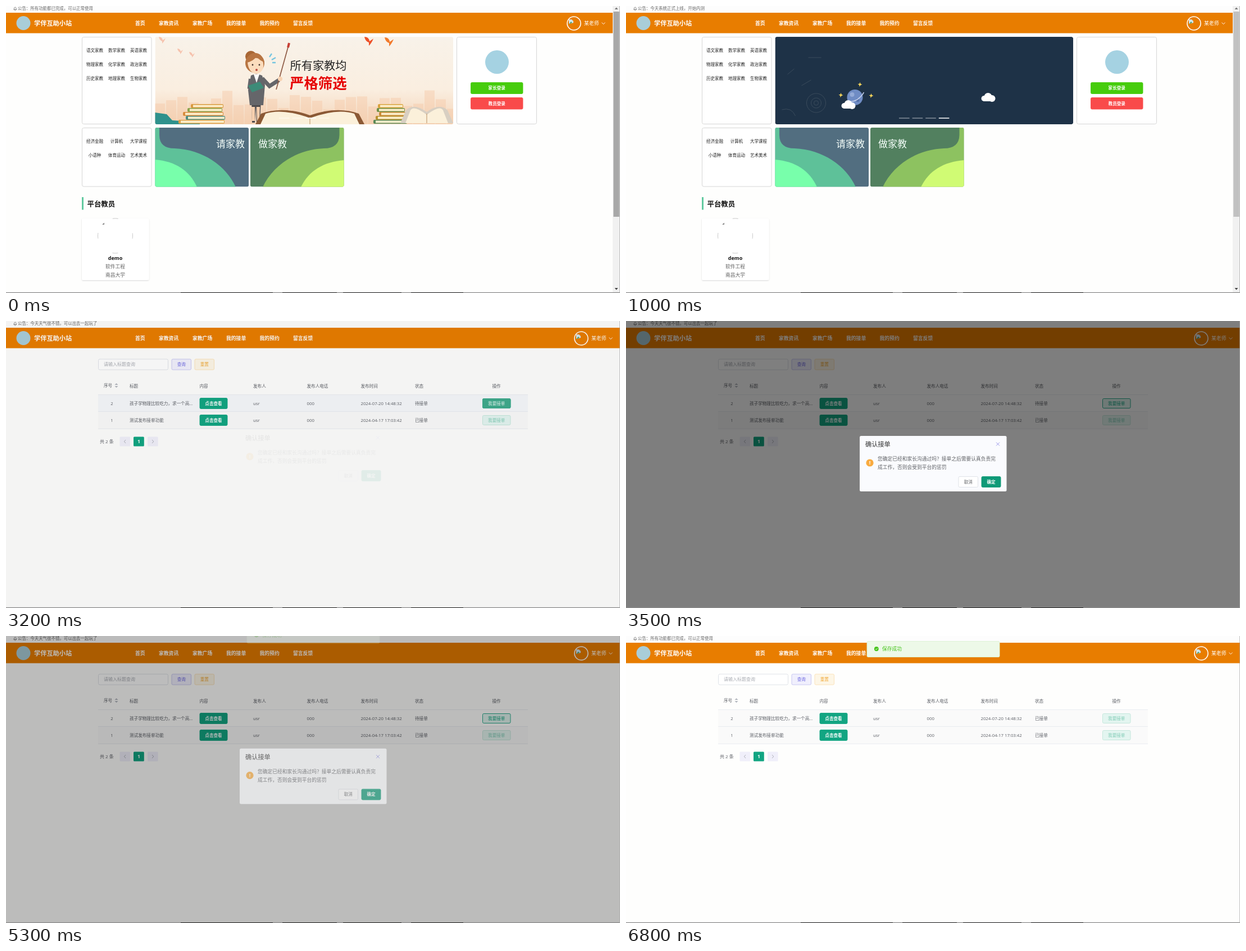
An HTML page for the animation above (8000 ms loop, 1093 by 512 pixels).

```html
<!DOCTYPE html>
<html lang="zh-CN">
<head>
<meta charset="utf-8">
<style>
html, body { margin: 0; width: 100%; height: 100%; overflow: hidden; background: #fefefd; }
svg { display: block; width: 100vw; height: 100vh; }
text { font-family: "Open Sans", "Noto Sans CJK SC", "Noto Sans CJK", sans-serif; white-space: pre; }
</style>
</head>
<body>
<svg id="stage" viewBox="0 0 1093 512"></svg>
<script>
const LOOP = 8000;
const GREEN = '#10a37f';

// Markup helpers; text is placed by its vertical centre.
const text = (s, x, cy, size, fill, { bold, mid, id } = {}) =>
  `<text ${id ? `id="${id}"` : ''} x="${x}" y="${cy + size * 0.37}" font-size="${size}" fill="${fill}"` +
  `${bold ? ' font-weight="700"' : ''}${mid ? ' text-anchor="middle"' : ''}>${s}</text>`;
const rect = (x, y, w, h, fill, attrs = '') =>
  `<rect x="${x}" y="${y}" width="${w}" height="${h}" fill="${fill}" ${attrs}/>`;
const path = (d, fill = 'none', attrs = '') => `<path d="${d}" fill="${fill}" ${attrs}/>`;
const line = (d, color, width = 1) => path(d, 'none', `stroke="${color}" stroke-width="${width}"`);
const circle = (x, y, r, fill, attrs = '') => `<circle cx="${x}" cy="${y}" r="${r}" fill="${fill}" ${attrs}/>`;
const group = (id, content, attrs = '') => `<g id="${id}" ${attrs}>${content}</g>`;
const box = (x, y, w, h, fill, stroke, r = 2) =>
  rect(x + 0.5, y + 0.5, w - 1, h - 1, fill, `stroke="${stroke}" stroke-width="0.9" rx="${r}"`);
const button = (label, x, y, w, h, fill, stroke, color, bold) =>
  box(x, y, w, h, fill, stroke) + text(label, x + w / 2, y + h / 2, 7.6, color, { bold, mid: true });

function header() {
  const nav = ['首页', '家教资讯', '家教广场', '我的接单', '我的预约', '留言反馈'];
  const starts = [230, 272, 332, 392, 451.5, 511];
  return rect(0, 0, 1093, 12, '#fdfdfd') +
    line('M13.5 6.5H19M14.5 6.5V3.5Q16.2 .5 18 3.5V6.5M15.6 8H17', '#666', 0.8) +
    text('公告：', 21, 4.5, 7.45, '#666') +
    ['所有功能都已完成，可以正常使用', '今天系统正式上线，开始内测', '今天天气很不错，可以出去一起玩了']
      .map((s, i) => text(s, 43.3, 4.5, 7.45, '#666', { id: 'notice' + i })).join('') +
    rect(0, 12, 1093, 36.5, '#e87d00') +
    circle(31, 30.5, 12.5, '#a9cdd8') +
    text('学伴互助小站', 50, 31, 11.2, '#fff', { bold: true }) +
    nav.map((s, i) => text(s, starts[i], 31, 8.8, '#fff', { bold: true })).join('') +
    group('account',
      circle(1011, 31, 12, 'none', 'stroke="#fff" stroke-width="1.6"') +
      path('M1002 24H1007L1010 27V30L1002 32Z', '#cfe6f5') + path('M1002 32L1006 28L1008 30Z', '#4b9c5a') +
      text('某老师', 1029, 31, 8.9, '#fff') + line('M1060.5 29.5L1063.5 32.5L1066.5 29.5', '#fff', 0.9));
}

const book = (x, y, w, color) =>
  rect(x, y, w, 7, color, 'rx="2"') + rect(x + 4, y + 1.5, w - 5, 4, '#fbeecb');
const openBook = (x, y, w, h, cover) => {
  const m = x + w / 2, b = y + h;
  return path(`M${x} ${b}L${x + 10} ${y + 6}Q${m - w / 4} ${y - 8} ${m} ${y + 9}Q${m + w / 4} ${y - 8} ${x + w - 10} ${y + 6}L${x + w} ${b}Z`, cover) +
    path(`M${x + 9} ${b}L${x + 18} ${y + 6}Q${m - w / 4} ${y - 4} ${m} ${y + 14}Q${m + w / 4} ${y - 4} ${x + w - 18} ${y + 6}L${x + w - 9} ${b}Z`, '#fbf0da') +
    line(`M${m} ${y + 12}V${b}`, '#b98e5e');
};
const bird = (x, y, size, color) =>
  path(`M${x - size} ${y - size}Q${x} ${y - size} ${x + 1} ${y}L${x + size} ${y - size * 0.6}Q${x + size * 0.6} ${y + size * 0.4} ${x} ${y + size}L${x} ${y + 2}Q${x - size * 0.8} ${y} ${x - size} ${y - size}Z`, color);

function teacher() {
  return path('M437 165H454L452 208H446L445 178L443 208H438Z', '#4d4a4c') +
    path('M437 180H443V205H438ZM446 180H452L451 205H447Z', '#f6cfae') +
    path('M436 124Q445 119 456 124L461 141L458 177H434L431 150Z', '#65666a') +
    path('M441 122L446 137L451 122Z', '#fff') +
    line('M456 129L469 143L486 132', '#65666a', 7) +
    line('M435 130L433 145L447 149', '#65666a', 6) +
    line('M481 149L503 70', '#8d5a45', 1.7) + line('M502 74L504 66', '#c83f35', 4) +
    circle(488, 130, 4, '#f8d3b3') +
    path('M431 142L452 135L459 146L438 154Z', '#3d8b78') +
    circle(436, 90, 10, '#a96735') + circle(443, 102, 17, '#b87542') +
    path('M430 99Q443 87 457 98Q462 117 446 121Q431 119 430 99Z', '#fbdcbd') +
    path('M428 101Q440 99 446 90Q452 98 460 100Q455 82 440 84Q428 88 428 101Z', '#b87542') +
    circle(439, 105, 1.4, '#41302a') + circle(451, 105, 1.4, '#41302a') +
    circle(446, 114, 2, '#b94c42') +
    line('M469 91L473 85M473 96L480 92M474 101L480 101', '#75c5e0', 2.3);
}

function lightSlide() {
  let skyline = '';
  for (let i = 0; i < 27; i++) {
    const h = 25 + 24 * Math.abs(Math.sin(i * 2.3)) + (i % 6 === 0 ? 12 : 0);
    skyline += rect(265 + i * 20, 211 - h, 18, h, '#f3c7a6', 'opacity=".45"');
  }
  return rect(265.5, 55, 530.5, 156, 'url(#cream)') + skyline +
    bird(278, 61, 6, '#f6c3ae') + bird(310, 81, 5, '#f6c3ae') + bird(331, 87, 5, '#f6c3ae') +
    bird(646, 63, 8, '#ee5128') + bird(682, 64, 8, '#f27a2c') +
    path('M265 211V190L286 193L296 204L345 207V211Z', '#2f918c') +
    book(329, 175, 58, '#d99a3f') + book(323, 182, 62, '#8ba34c') + book(315, 189, 72, '#d88b3d') + book(320, 196, 70, '#4b8c82') + book(307, 203, 82, '#dfa248') +
    teacher() + openBook(444, 186, 194, 25, '#8b5935') +
    book(662, 175, 45, '#d9a33d') + book(660, 182, 50, '#709046') + book(664, 189, 48, '#c98a36') + book(658, 196, 56, '#b8912f') + book(654, 203, 60, '#5a8a58') +
    openBook(702, 180, 94, 29, '#d8cfc2') +
    text('所有家教均', 505.5, 107, 20.2, '#222') +
    text('严格筛选', 505, 138, 25.4, '#e60000', { bold: true });
}

const star = (x, y) => path(`M${x} ${y - 4}L${x + 1.3} ${y - 1}L${x + 4} ${y}L${x + 1} ${y + 1.2}L${x - 1} ${y + 4}L${x - 1.3} ${y + 1}L${x - 4} ${y - 1}L${x - 1} ${y - 1.3}Z`, '#f7d65a');
const cloud = (x, y) => circle(x, y, 7, '#fff') + circle(x - 7, y + 3, 5, '#fff') + circle(x + 7, y + 3, 6, '#fff') + rect(x - 8, y + 1, 16, 7, '#fff');

function darkSlide() {
  return group('dark', rect(796, 55, 530.5, 156, '#1e3247', 'rx="3"') +
    group('doodles',
      circle(869, 173, 17, 'none') + circle(869, 173, 9, 'none') + circle(869, 173, 4, 'none') +
      path('M855 92H878M808 185Q825 180 832 196M818 122L830 112M843 142L860 132'),
      'stroke="#3a4b5c" stroke-width="1"') +
    circle(938, 163, 14, '#6f8cc4') + circle(933, 158, 4, '#94abd7') + circle(943, 168, 3, '#526fa9') +
    line('M922 170Q942 174 954 154', '#c3cfeb', 1.5) +
    cloud(926, 175) + star(913, 159) + star(947, 140) + star(967, 160) + cloud(1175, 162));
}

function home() {
  const subjects = [
    ['语文家教', '数学家教', '英语家教', 79], ['物理家教', '化学家教', '政治家教', 104], ['历史家教', '地理家教', '生物家教', 129],
    ['经济金融', '计算机', '大学课程', 241], ['小语种', '体育运动', '艺术美术', 266]];
  const tile = (x, bg, hill, hillPath, glow, glowPath, label, labelX) =>
    `<g clip-path="url(#tile${x})">` + rect(x, 217, 166.5, 105.5, bg) + path(hillPath, hill) + path(glowPath, glow) +
    text(label, labelX, 246, 17, '#f5fffa') + '</g>';
  return box(135, 55, 124.5, 156, '#fff', '#d2d2d2', 3) + box(135, 217, 124.5, 105.5, '#fff', '#d2d2d2', 3) +
    subjects.map(([a, b, c, y]) => [a, b, c].map((s, i) => text(s, 158 + i * 39, y, 7.5, '#222', { mid: true })).join('')).join('') +
    `<g clip-path="url(#banner)">` + group('slides', lightSlide() + darkSlide()) +
    [0, 1, 2, 3].map(i => rect(486 + i * 23.6, 199.3, 18.6, 1.5, '#fff', `id="dot${i}"`)).join('') + '</g>' +
    box(802, 55, 143, 156, '#fff', '#d2d2d2', 3) + circle(874, 100, 21, '#a5d2e2') +
    button('家长登录', 827, 136, 93.5, 21, '#46cc0c', '#46cc0c', '#fff', true) +
    button('教员登录', 827, 163, 93.5, 21.5, '#f94a4a', '#f94a4a', '#fff', true) +
    tile(265.5, '#526e80', '#5ec199', 'M265 217H273V230Q273 254 300 254C350 256 392 285 409 323H265Z',
      '#78ffab', 'M265 274C302 277 327 294 340 323H265Z', '请家教', 374) +
    tile(435, '#52805f', '#8dc260', 'M602 217H593.5V230Q593 254 566 254C516 256 475 285 457 323H602Z',
      '#d0fb74', 'M602 275C565 278 539 294 525 323H602Z', '做家教', 449) +
    rect(135, 341, 3, 22.5, '#62caa0') + text('平台教员', 144.5, 353, 12.4, '#111', { bold: true }) +
    rect(135, 379, 119.5, 110, '#fff', 'rx="2" filter="url(#shadow)"') +
    circle(194.5, 410, 31, 'none', 'stroke="#bbb" stroke-width=".8" stroke-dasharray="10 38.7" stroke-dashoffset="5"') +
    path('M171 390L175 386.5V390Z', '#888') +
    text('demo', 194.5, 450, 9, '#111', { bold: true, mid: true }) +
    text('软件工程', 194.5, 465, 8.75, '#666', { mid: true }) + text('南昌大学', 194.5, 480, 8.75, '#666', { mid: true });
}

const scrollbar = () => rect(1080, 0, 13, 511, '#f1f1f1') + rect(1081.3, 10, 10.5, 366, '#c1c1c1', 'id="thumb"') +
  path('M1083.5 6L1086.5 2.5L1089.5 6Z', '#777') + path('M1083.5 503L1086.5 506.5L1089.5 503Z', '#444');

function listPage() {
  const columns = [['标题', 220], ['内容', 344.5], ['发布人', 440], ['发布人电话', 535.5], ['发布时间', 631.5], ['状态', 728]];
  const ink = '#5c5f66';
  const action = (y, kind) => ({
    off: button('我要接单', 848, y, 50.5, 18, '#e3f5f0', '#c0e6da', '#7fcbb5'),
    on: button('我要接单', 848, y, 50.5, 18, '#e0f4ee', GREEN, GREEN),
    hover: button('我要接单', 848, y, 50.5, 18, '#3fab8d', '#3fab8d', '#eefaf6')
  })[kind];
  const row = (no, title, date, cy) =>
    text(no, 188.5, cy, 7.6, ink, { mid: true }) + text(title, 220, cy, 7.6, ink) +
    button('点击查看', 344.5, cy - 10, 50, 20, '#12a582', '#12a582', '#fff', true) +
    text('usr', 440, cy, 7.8, ink) + text('000', 535.5, cy, 7.8, ink) + text(date, 631.5, cy, 7.75, ink);
  const chevron = (x, dir) => rect(x - 9.3, 206.5, 18.6, 17, '#f0effa', 'rx="1.5"') +
    line(`M${x - dir * 1.3} 212L${x + dir * 1.5} 215L${x - dir * 1.3} 218`, '#a8abb2', 0.9);
  return box(164, 67.5, 125, 20, '#fff', '#dcdfe6', 2.5) + text('请输入标题查询', 174, 77.5, 8, '#a8abb2') +
    button('查询', 294.5, 67.5, 35.5, 20, '#f0effd', '#c5c3f0', '#6b66e0') +
    button('重置', 335.5, 67.5, 35.5, 20, '#fdf6e6', '#fbe0b5', '#f0a93a') +
    text('序号', 174, 115, 7.6, ink) + path('M193.5 114L196.5 111L199.5 114Z', '#b0b4bc') + path('M193.5 116L196.5 119L199.5 116Z', '#b0b4bc') +
    columns.map(([s, x]) => text(s, x, 116, 7.6, ink)).join('') + text('操作', 873, 116, 7.6, ink, { mid: true }) +
    rect(164, 132, 765, 29.5, '#f6f8fb', 'id="rowHover"') + rect(164, 162, 765, 30, '#fafafa') +
    line('M164 131.5H929M164 161.5H929M164 192.3H929', '#e8ebf0', 0.9) +
    group('rows',
      row('2', '孩子学物理比较吃力，求一个高...', '2024-07-20 14:48:32', 147) + row('1', '测试发布接单功能', '2024-04-17 17:03:42', 177) +
      group('open', text('待接单', 728, 147, 7.6, ink) + action(138, 'on') + group('actionHover', action(138, 'hover'))) +
      group('taken', text('已接单', 728, 147, 7.6, ink) + action(138, 'off')) +
      text('已接单', 728, 177, 7.6, ink) + action(168, 'off') +
      text('共 2 条', 167, 215, 8, ink) + chevron(211.8, -1) + chevron(261.3, 1) +
      rect(227, 206.5, 18.8, 17, '#12a582', 'rx="1.5"') + text('1', 236.4, 215, 8.5, '#fff', { bold: true, mid: true }));
}

const modal = () => rect(416, 205, 261.5, 99, '#fafbfe', 'rx="2.5"') + text('确认接单', 426, 220, 11.2, '#333') +
  line('M659 216.5L665 222.5M665 216.5L659 222.5', '#8f8de8', 0.9) +
  circle(434, 253, 6.6, '#f9ab40') + text('!', 434, 253, 9, '#fff', { bold: true, mid: true }) +
  text('您确定已经和家长沟通过吗？接单之后需要认真负责完', 448, 246, 8.75, '#606266') +
  text('成工作，否则会受到平台的惩罚', 448, 261, 8.75, '#606266') +
  button('取消', 591.5, 277, 35.5, 20, '#fff', '#dcdfe6', '#606266') +
  button('确定', 632.5, 277, 35, 20, '#0f9a78', '#0f9a78', '#fff', true);

const toast = () => box(428.5, 9, 237, 29, '#edf9e8', '#dcf2d2') + circle(445.8, 23, 3.9, '#46c41c') +
  line('M444 23L445.4 24.4L447.8 21.8', '#fff', 0.9) + text('保存成功', 456, 23, 8.75, '#46c41c');

const roundClip = (id, x, y, w, h) => `<clipPath id="${id}">${rect(x, y, w, h, '#000', 'rx="3"')}</clipPath>`;

document.getElementById('stage').innerHTML =
  `<defs><linearGradient id="cream" x2="0" y2="1"><stop stop-color="#f8f2e9"/><stop offset=".6" stop-color="#faeee0"/><stop offset="1" stop-color="#f4d5b9"/></linearGradient>
  <filter id="shadow"><feDropShadow dx="0" dy="1" stdDeviation="1" flood-opacity=".15"/></filter>` +
  roundClip('banner', 265.5, 55, 530.5, 156) + roundClip('tile265.5', 265.5, 217, 166.5, 105.5) + roundClip('tile435', 435, 217, 166.5, 105.5) + '</defs>' +
  rect(0, 0, 1093, 512, '#fefefd') + group('header', header()) + group('home', home() + scrollbar()) + group('list', listPage()) +
  rect(0, 0, 1093, 512, '#000', 'id="shade"') + group('modal', modal()) + group('toast', toast()) +
  line('M0 511.3H1093', '#8a8a8a', 1.2) + line('M1092.6 0V512', '#aaa', 0.8) +
  line('M311 511.5H475M492 511.5H589M600 511.5H704M721 511.5H814', '#252525', 1.2);

const el = Object.fromEntries([...document.querySelectorAll('#stage [id]')].map(n => [n.id, n]));
const ramp = (t, start, length) => Math.min(1, Math.max(0, (t - start) / length));
const smooth = (t, start, length) => { const p = ramp(t, start, length); return p * p * (3 - 2 * p); };
const show = (id, visible) => el[id].setAttribute('display', visible ? 'inline' : 'none');
const fade = (id, opacity) => el[id].setAttribute('opacity', opacity);
const shift = (id, x, y) => el[id].setAttribute('transform', `translate(${x} ${y})`);

function render(t) {
  const onHome = t < 1700, onList = t >= 1900;
  show('home', onHome);
  show('list', onList);
  show('header', onHome || onList);
  shift('account', onHome ? 0 : 13, 0);

  const [second, third, again] = [450, 2010, 6550].map(start => ramp(t, start, 200));
  fade('notice0', 1 - second + again);
  fade('notice1', second - third);
  fade('notice2', third - again);

  el.thumb.setAttribute('fill', t < 100 ? '#a8a8a8' : '#c1c1c1');
  shift('slides', -530.5 * smooth(t, 560, 400), 0);
  for (let i = 0; i < 4; i++) fade('dot' + i, i === (t < 560 ? 2 : 3) ? 1 : 0.45);

  const taken = t >= 5350;
  show('rows', t >= 2100);
  show('open', !taken);
  show('taken', taken);
  fade('actionHover', t < 3450 ? ramp(t, 2650, 150) : 0);
  const hovered = t >= 2100 && t < 3450;
  show('rowHover', hovered || t >= 5900);
  el.rowHover.setAttribute('fill', hovered ? '#f6f8fb' : '#fafafa');

  const opened = smooth(t, 3150, 300);
  const dialog = opened - smooth(t, 5195, 260);
  fade('shade', 0.5 * (opened - smooth(t, 5195, 220)));
  fade('modal', dialog);
  shift('modal', 0, -12 * (1 - dialog));

  fade('toast', ramp(t, 5268, 300) * (2 - ramp(t, 5268, 300)));
  shift('toast', 0, -29 * (1 - ramp(t, 5268, 400)) ** 2);
}

const began = performance.now();
function tick() {
  render((performance.now() - began) % LOOP);
  requestAnimationFrame(tick);
}
tick();
</script>
</body>
</html>
```
